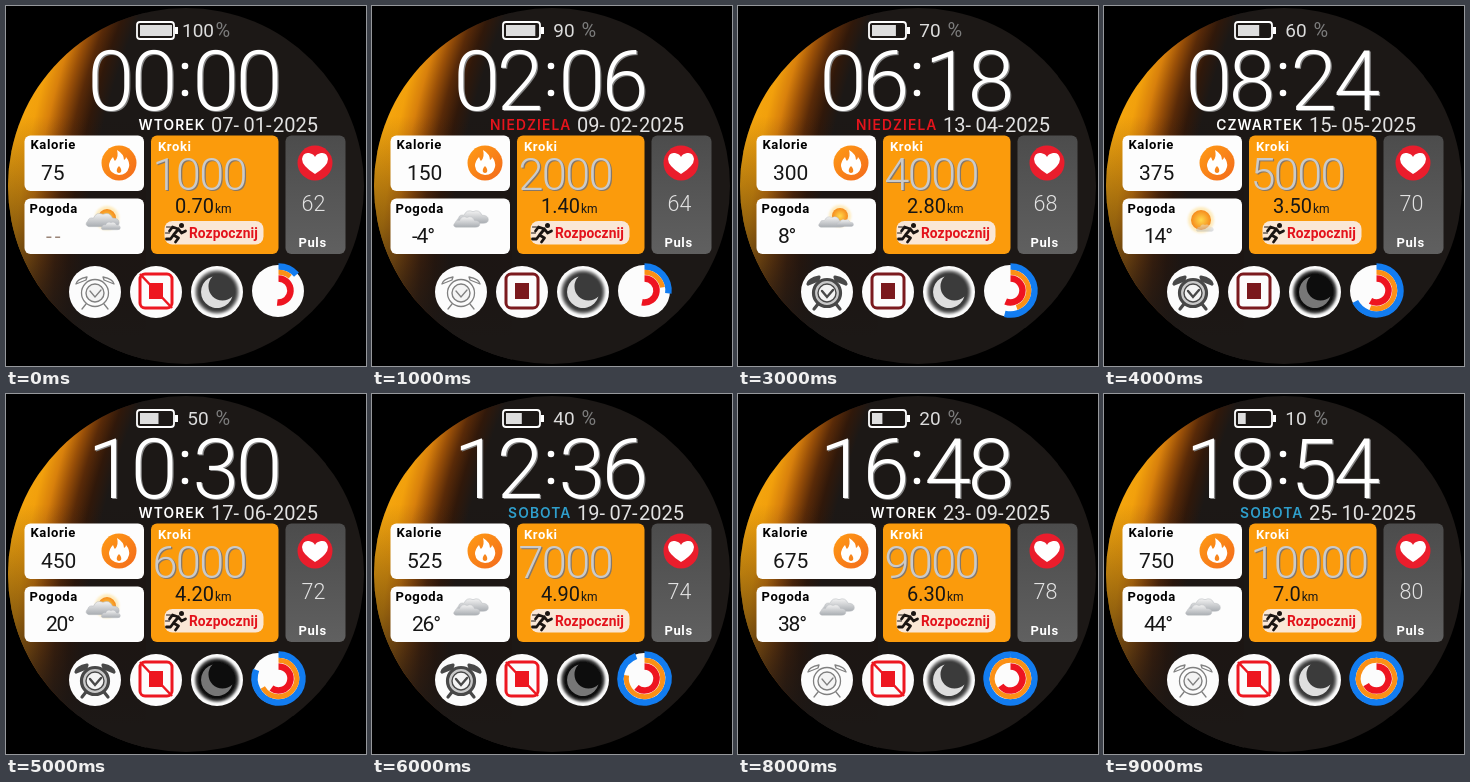
These frames come from a looping animation (360x360 px, 10 s). An HTML page:

```html
<!DOCTYPE html>
<html lang="pl">
<head>
<meta charset="utf-8">
<title>Tarcza zegarka</title>
<style>
html, body { margin: 0; width: 100%; height: 100%; overflow: hidden; background: #000; }
svg { display: block; width: 100vw; height: 100vh; }
text { font-family: Roboto, "Open Sans", sans-serif; white-space: pre; }
.label { font-weight: 700; font-size: 13px; letter-spacing: .6px; }
.weekday { font-family: Inter, sans-serif; font-weight: 600; font-size: 13.8px; letter-spacing: 1.1px; }
.time { font-weight: 300; font-size: 84px; letter-spacing: -3.3px; }
.steps { font-weight: 300; font-size: 45px; letter-spacing: -1.6px; }
.date { font-size: 20px; fill: #e2e2e2; }
.value { font-size: 21px; fill: #161616; }
</style>
</head>
<body>
<svg viewBox="0 0 360 360">
  <defs>
    <clipPath id="face"><circle cx="180" cy="180" r="178"/></clipPath>
    <filter id="haze" x="-50%" y="-50%" width="200%" height="200%"><feGaussianBlur stdDeviation="1.2"/></filter>
    <radialGradient id="glow" gradientUnits="userSpaceOnUse" cx="800" cy="290" r="820">
      <stop offset=".882" stop-color="#1c1816"/>
      <stop offset=".9" stop-color="#30180a"/>
      <stop offset=".917" stop-color="#592a08"/>
      <stop offset=".933" stop-color="#9a5008"/>
      <stop offset=".949" stop-color="#d8800c"/>
      <stop offset=".966" stop-color="#f2a00c"/>
      <stop offset="1" stop-color="#f8ac10"/>
    </radialGradient>
    <linearGradient id="dusk" gradientUnits="userSpaceOnUse" x1="0" y1="110" x2="0" y2="330">
      <stop offset="0" stop-color="#1c1310" stop-opacity="0"/>
      <stop offset=".5" stop-color="#1c1310" stop-opacity=".45"/>
      <stop offset="1" stop-color="#1c1816"/>
    </linearGradient>
    <linearGradient id="panel" x1="0" y1="0" x2="0" y2="1">
      <stop offset="0" stop-color="#4c4c4c"/><stop offset="1" stop-color="#606060"/>
    </linearGradient>
    <linearGradient id="flame" x1="0" y1="0" x2="1" y2="1">
      <stop offset="0" stop-color="#ff9c14"/><stop offset="1" stop-color="#f36a1d"/>
    </linearGradient>
    <radialGradient id="sun">
      <stop offset="0" stop-color="#ffd84a"/><stop offset="1" stop-color="#f58a1c"/>
    </radialGradient>
    <linearGradient id="cloud" x1="0" y1="0" x2="0" y2="1">
      <stop offset="0" stop-color="#f2f2f2"/><stop offset="1" stop-color="#a9adb2"/>
    </linearGradient>
  </defs>

  <rect width="360" height="360"/>
  <g clip-path="url(#face)">
    <rect width="360" height="360" fill="#1c1816"/>
    <rect width="140" height="360" fill="url(#glow)"/>
    <rect width="140" height="360" fill="url(#dusk)"/>
  </g>

  <g fill="none" stroke="#fff" stroke-width="1.8">
    <rect x="131" y="16" width="37" height="17" rx="3"/>
    <path d="M170.5 21v7" stroke-width="3"/>
  </g>
  <rect id="charge" x="134" y="19" height="11" fill="#dedede"/>
  <text id="battery" x="192" y="31" text-anchor="middle" font-size="19" fill="#dcdcdc"/>
  <text x="209.5" y="31" font-size="20" fill="#7c7c7c">%</text>

  <g id="clock"></g>
  <g fill="#fff"><circle cx="179" cy="60" r="3.3"/><circle cx="179" cy="87" r="3.3"/></g>
  <text id="weekday" x="199.5" y="123.5" text-anchor="end" class="weekday"/>
  <g class="date">
    <text id="day" x="205" y="126"/><text x="227.5" y="126">-</text>
    <text id="month" x="237.5" y="126"/><text x="260" y="126">-</text>
    <text x="267" y="126">2025</text>
  </g>

  <g fill="#fdfdfd">
    <rect x="18.5" y="129.5" width="119.5" height="55.5" rx="6"/>
    <rect x="18.5" y="192.5" width="119.5" height="55.5" rx="6"/>
  </g>
  <rect x="145" y="129.5" width="127.5" height="118.5" rx="6" fill="#fb9b0c"/>
  <rect x="279.5" y="129.5" width="60" height="118.5" rx="6" fill="url(#panel)"/>

  <text x="24.5" y="143" class="label">Kalorie</text>
  <text id="calories" x="35" y="174" class="value"/>
  <circle cx="113" cy="157" r="17.5" fill="url(#flame)"/>
  <path d="M111 144Q118 148 118 154Q120 153 120 151Q124 156 123 161Q121 169 113 169Q104 168 103 160Q103 155 107 151Q108 154 109 155Q113 151 111 144Z" fill="#fff"/>
  <path d="M113 160Q116 163 115 166Q113 168 111 166Q110 163 113 160Z" fill="#f7861d"/>

  <text x="23.5" y="207" class="label">Pogoda</text>
  <text id="degrees" x="40" y="237" class="value"/>
  <g id="sky"></g>

  <text x="152" y="145" class="label" fill="#fff">Kroki</text>
  <g id="count"></g>
  <text x="169" y="207" class="value" style="font-size:20px"><tspan id="distance"/><tspan font-size="12" dx="1">km</tspan></text>
  <rect x="158.5" y="215" width="99" height="23.5" rx="8" fill="#fae7d6"/>
  <g transform="translate(-1.5 0)">
    <g fill="none" stroke="#1b1512" stroke-width="2.8" stroke-linecap="round" stroke-linejoin="round">
      <path d="M174 223L169 229L174 232L171 236M169 229L166 233H162M174 223L168 221L165 225M174 223L177 227L181 225"/>
      <path d="M162 221h4M161 227h4" stroke-width="1"/>
    </g>
    <circle cx="177" cy="219.5" r="2.5" fill="#1b1512"/>
  </g>
  <text x="183" y="231.5" class="label" style="font-size:13.8px;letter-spacing:.05px" fill="#e3121b">Rozpocznij</text>

  <circle cx="309" cy="157" r="17.5" fill="#ea1d2c"/>
  <path d="M309 168Q296 160 296 153Q297 146 303 147Q308 148 309 151Q310 148 315 147Q321 146 322 153Q322 160 309 168Z" fill="#fff"/>
  <text id="pulse" x="307.5" y="205" text-anchor="middle" font-size="21.5" font-weight="300" fill="#e2e2e2"/>
  <text x="292.5" y="241" class="label" fill="#fff">Puls</text>

  <g fill="#fcfcfc">
    <circle cx="89" cy="286" r="26"/><circle cx="150" cy="286" r="26"/>
    <circle cx="211" cy="286" r="26"/><circle cx="272" cy="285" r="26"/>
  </g>
  <g id="alarm" transform="translate(89 287)" fill="none" stroke-linecap="round"></g>
  <g id="link" transform="translate(150 285)"></g>
  <g id="moon" transform="translate(211 286)"></g>
  <g id="rings" transform="translate(272.5 284.5)" fill="none"></g>
</svg>
<script>
const $ = id => document.getElementById(id);
const pad = n => String(n).padStart(2, '0');
const put = (id, text) => { $(id).textContent = text; };

const WHITE = '#fff', RED = '#e5141c', BLUE = '#2f9fcc';
const names = { w: ['WTOREK', WHITE], n: ['NIEDZIELA', RED], c: ['CZWARTEK', WHITE], s: ['SOBOTA', BLUE] };
const days = 'wnwncwscws';
const skies = ['hazy', 'cloud', 'hazy', 'fair', 'sun', 'hazy', 'cloud', 'wind', 'cloud', 'cloud'];

// Light glyphs with a grey edge below and to the right
function raised(cls, x, y, text, fill, shade) {
  const t = (d, c) => `<text class="${cls}" x="${x + d}" y="${y + d}" fill="${c}">${text}</text>`;
  return t(1.2, shade) + t(0, fill);
}

function sky(kind) {
  const cloud = (x, y, s) => `<path transform="translate(${x} ${y}) scale(${s})" fill="url(#cloud)" stroke="#b9bcc0" stroke-width=".6"
    d="M-15 7Q-20 5-16 1Q-15-3-10-2Q-7-9 0-6Q7-9 10-2Q17-2 17 3Q17 7 11 7Z"/>`;
  const sun = (x, y, r) => `<circle cx="${x}" cy="${y}" r="${r + 3}" fill="#ffd773" opacity=".45" filter="url(#haze)"/>
    <circle cx="${x}" cy="${y}" r="${r}" fill="url(#sun)"/>`;
  switch (kind) {
    case 'hazy': return sun(101, 212, 9) + cloud(97, 214, .95) + cloud(105, 220, .55);
    case 'fair': return sun(102, 210, 8) + cloud(94, 216, .75) + cloud(107, 217, .5);
    case 'sun': return sun(97, 214, 10) + `<g opacity=".45">${cloud(101, 222, .5)}</g>`;
    case 'wind': return cloud(101, 212, .8) + cloud(92, 217, .6) +
      '<path d="M82 218h20M90 222h24" stroke="#8d9299" stroke-width="1.2"/>';
    default: return cloud(101, 211, .9) + cloud(95, 216, .75);
  }
}

function alarm(on) {
  const ink = on ? '#484848' : '#808080';
  return `<g stroke="${ink}" stroke-width="${on ? 3.2 : 1.3}">
    <circle r="13.5" fill="${on ? '#c9c9c9' : 'none'}"/>
    <circle r="9" stroke-width="1.4" fill="#f4f4f4"/>
    <path d="M-19-9Q-18-14-8-16L-9-13ZM19-9Q18-14 8-16L9-13Z" fill="${on ? ink : 'none'}" stroke-linejoin="round"/>
    <path d="M-9 11l-4 5M9 11l4 5"/>
    <path d="M-5-2L0 4L6-3" stroke-width="${on ? 2.4 : 1.3}"/></g>`;
}

function link(on) {
  const ink = on ? '#7a191d' : '#ed1720';
  return `<rect x="-16" y="-17" width="32" height="34" rx="5" fill="none" stroke="${ink}" stroke-width="3"/>
    <rect x="-7" y="-8" width="14" height="16" fill="${ink}"/>` +
    (on ? '' : `<path d="M-16-17L16 17" stroke="${ink}" stroke-width="2.5"/>`);
}

function moon(dim) {
  return `<circle r="21" fill="${dim ? '#0c0c0c' : '#3a3a3a'}" stroke="${dim ? '#555' : '#8c8c8c'}" stroke-width="2" filter="url(#haze)"/>
    <path d="M-4.4-15.4A16 16 0 1 0 15.4 4.4A14 14 0 1 1-4.4-15.4Z" fill="${dim ? '#777' : '#dedede'}"/>`;
}

function ring(r, width, color, angle) {
  const a = Math.min(angle, 359.9) * Math.PI / 180;
  const x = r * Math.sin(a), y = -r * Math.cos(a);
  return `<path d="M0 ${-r}A${r} ${r} 0 ${a > Math.PI ? 1 : 0} 1 ${x} ${y}" stroke="${color}" stroke-width="${width}"/>`;
}

function show(i) {
  const n = i + 1;
  const level = 100 - 10 * i;
  const heart = 62 + 2 * i;
  const [name, color] = names[days[i]];

  $('charge').setAttribute('width', 5 + .27 * level);
  put('battery', level);
  $('clock').innerHTML = raised('time', 81.5, 104, pad(2 * i), WHITE, '#858585') +
    raised('time', 186.5, 104, pad(6 * i), WHITE, '#858585');
  put('weekday', name);
  $('weekday').setAttribute('fill', color);
  put('day', pad(7 + 2 * i));
  put('month', pad(n));

  put('calories', 75 * n);
  put('degrees', i ? 6 * i - 10 + '°' : '--');
  $('degrees').setAttribute('style', i ? 'letter-spacing:-1.2px' : 'fill:#9a8578;letter-spacing:3px');
  $('sky').innerHTML = sky(skies[i]);
  $('count').innerHTML = raised('steps', 146.5, 184, 1000 * n, '#cacaca', '#85776a');
  put('distance', n === 10 ? '7.0' : (.7 * n).toFixed(2));
  put('pulse', heart);

  $('alarm').innerHTML = alarm(i >= 3 && i <= 6);
  $('link').innerHTML = link(i >= 1 && i <= 4);
  $('moon').innerHTML = moon(i >= 4 && i <= 7);
  $('rings').innerHTML = ring(24, 6.5, '#127cf0', 48.5 * n) +
    ring(18.2, 5, '#fb9016', 40 * n) + ring(12, 6.5, '#ee1420', 3 * heart);
}

let last = -1;
const start = performance.now();
function tick() {
  const i = Math.floor((performance.now() - start) / 1000) % 10;
  if (i !== last) show(last = i);
  requestAnimationFrame(tick);
}
tick();
</script>
</body>
</html>
```
